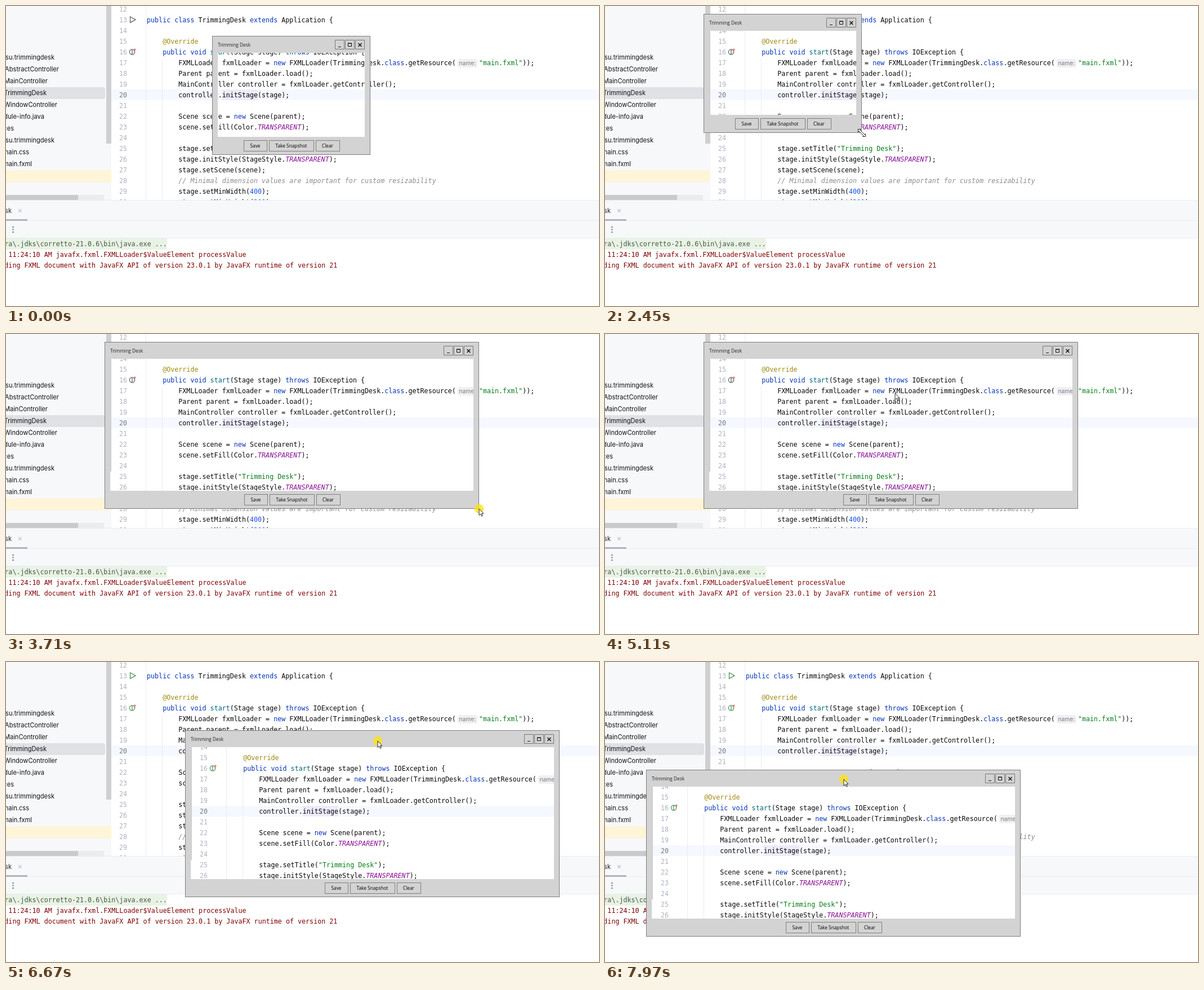
Recreate the animation shown at these times as an HTML page. Size 1053 by 532 pixels, loop 8000 ms.

```html
<!DOCTYPE html>
<html lang="en">
<head>
<meta charset="utf-8">
<title>Trimming Desk</title>
<style>
html, body { margin: 0; width: 1053px; height: 532px; overflow: hidden; background: #fff; }
div, pre, svg { position: absolute; margin: 0; box-sizing: border-box; }
.scene { left: 0; top: 0; width: 1053px; height: 532px; overflow: hidden; background: #fff; }
pre { font: 11.7px/19px "DejaVu Sans Mono", monospace; color: #080808; white-space: pre; }

.editor { left: 187px; top: 0; width: 866px; height: 344px; overflow: hidden; }
.editor > * { position: absolute; }
.caret { left: 0; top: 148px; width: 866px; height: 19px; background: #f5f8fe; }
.used { left: 197px; top: 148px; width: 63px; height: 19px; background: #edebfb; }
.guide { width: 1px; background: #ebecf0; }
.nums { left: 0; top: -3px; width: 28px; text-align: right; color: #aeb3c2; }
.nums b { color: #767a8a; font-weight: normal; }
.code { left: 63px; top: -3px; }
.code b { color: #0033b3; font-weight: normal; }
.code i { color: #871094; }
.code em { color: #8c8c8c; }
.code .s { color: #067d17; }
.code .n { color: #1750eb; }
.code .m { color: #00627a; }
.code .a { color: #9e880d; }
.code u { display: inline-block; width: 35px; height: 15px; margin: 0 3px; border-radius: 3px; vertical-align: middle;
  background: #f0f0f2; color: #7a7d85; font: 10.3px/15px Inter, sans-serif; text-align: center; text-decoration: none; }
.icons { left: 0; top: 0; overflow: visible; fill: none; stroke: var(--icon); }

.tree { left: 0; top: 0; width: 187px; height: 344px; overflow: hidden; background: #f7f8fa; }
.row { left: -100px; height: 21px; font: 11.1px/21px Inter, sans-serif; color: #111; text-align: right; white-space: pre; }
.panel { left: 0; top: 344px; width: 1053px; height: 68px; background: #f7f8fa; border: solid #ebecf0; border-width: 1px 0; }
.panel div { font: 11.1px/20px Inter, sans-serif; color: #222; }
.log { left: -2.7px; top: 413px; color: #7f0000; }
.log span { display: inline-block; height: 19px; background: #e8f3e4; box-shadow: 0 -1px #e8f3e4; color: #46554a; }

#win { border: 1px solid #7f7f7f; font: 8.3px/20px "Open Sans", "Noto Sans", sans-serif; color: #222; }
#frame { inset: 0; border: solid #d3d3d3; border-width: 29px 9px 31px; }
#view { inset: 29px 9px 31px; overflow: hidden; }
#view .scene { left: -185px; top: -44px; }
.title { left: 9px; top: 5px; white-space: pre; }
.ctl { right: 9px; top: 6px; fill: none; stroke: #777; }
.btn { bottom: 5px; height: 20px; border: 1px solid #7f7f7f; background: #d3d3d3; color: #000; line-height: 18px; text-align: center; white-space: pre; }
#snap.hover { background: #dedede; }
#snap.press { background: #c8c8c8; }
#mouse { left: 0; top: 0; width: 1px; height: 1px; overflow: visible; }
</style>
</head>
<body>
<div class="scene">
  <div class="tree">
    <div style="left:-8px;top:144px;width:184px;height:21px;border-radius:4px;background:#dfe1e5"></div>
    <div style="left:0;top:291px;width:187px;height:22px;background:#fef5d9"></div>
    <div style="left:178px;top:0;width:9px;height:244px;background:#cfcfd1"></div>
    <div style="left:0;top:335px;width:174px;height:9px;background:#ececee"></div>
    <div style="left:0;top:335px;width:128px;height:9px;background:#c9cacc"></div>
  </div>
  <div class="editor">
    <div class="caret"></div>
    <div class="used"></div>
    <div class="guide" style="left:61px;top:0;height:344px"></div>
    <div class="guide" style="left:90px;top:92px;height:252px"></div>
    <pre class="nums"></pre>
<pre class="code">

<b>public class</b> TrimmingDesk <b>extends</b> Application {

    <span class="a">@Override</span>
    <b>public void</b> <span class="m">start</span>(Stage stage) <b>throws</b> IOException {
        FXMLLoader fxmlLoader = <b>new</b> FXMLLoader(TrimmingDesk.<b>class</b>.getResource(<u>name:</u><span class="s">"main.fxml"</span>));
        Parent parent = fxmlLoader.load();
        MainController controller = fxmlLoader.getController();
        controller.initStage(stage);

        Scene scene = <b>new</b> Scene(parent);
        scene.setFill(Color.<i>TRANSPARENT</i>);

        stage.setTitle(<span class="s">"Trimming Desk"</span>);
        stage.initStyle(StageStyle.<i>TRANSPARENT</i>);
        stage.setScene(scene);
        <em>// Minimal dimension values are important for custom resizability</em>
        stage.setMinWidth(<span class="n">400</span>);
        stage.setMinHeight(<span class="n">300</span>);
</pre>
    <svg class="icons" width="60" height="344">
      <path d="M33.5 19v10.4l9.5-5.2z" stroke-width="1.2"/>
      <circle cx="37" cy="81.5" r="4.6" stroke-width="1.2"/>
      <path d="M35.5 79h3M37 79v5M35.5 84h3"/>
      <path d="M41.8 82v-6M39.8 78l2-2.2 2 2.2" stroke="#d9543f"/>
    </svg>
  </div>
  <div class="panel">
    <div style="left:0;top:35px;width:1053px;height:1px;background:#ebecf0"></div>
    <div style="left:0;top:33px;width:38px;height:3px;background:#b0b2bc"></div>
    <div style="right:1043px;top:8px">sk</div>
    <svg style="left:21px;top:14px" width="8" height="8" stroke="#a3a6b0"><path d="M1 1l6 6M7 1l-6 6"/></svg>
    <svg style="left:11px;top:45px" width="3" height="13" fill="#55585f"><path d="M.5 1h2v2h-2zM.5 5.5h2v2h-2zM.5 10h2v2h-2z"/></svg>
  </div>
<pre class="log"><span>ra\.jdks\corretto-21.0.6\bin\java.exe ...</span>
 11:24:10 AM javafx.fxml.FXMLLoader$ValueElement processValue
ding FXML document with JavaFX API of version 23.0.1 by JavaFX runtime of version 21</pre>
</div>

<div id="win">
  <div id="frame"></div>
  <div id="view"></div>
  <div class="title">Trimming Desk</div>
  <svg class="ctl" width="53" height="17">
    <path d="M.5.5h16v16H.5zM18.5.5h16v16h-16zM36.5.5h16v16h-16z"/>
    <path d="M6 12.5h5M23.5 6.5h6v5h-6zM23 6h7" stroke="#111"/>
    <path d="M41.5 6l6 6M47.5 6l-6 6" stroke="#111" stroke-width="1.5"/>
  </svg>
  <div class="btn" style="left:calc(50% - 85px);width:42px">Save</div>
  <div class="btn" id="snap" style="left:calc(50% - 40px);width:80px">Take Snapshot</div>
  <div class="btn" style="left:calc(50% + 43px);width:43px">Clear</div>
</div>

<svg id="mouse">
  <circle id="glow" r="8.3" fill="#fbe214" fill-opacity=".8"/>
  <path id="arrow" d="M0 0v11.5l2.7-2.5 1.9 4.2 1.8-.8-1.8-4H8z" fill="#fff" stroke="#111" stroke-width=".9"/>
  <path id="resize" d="M-6.5-6.5h5L-3-5l8 8 1.5-1.5v5h-5L3 5l-8-8-1.5 1.5z" fill="#fff" stroke="#111" stroke-width=".9"/>
</svg>

<script>
const $ = s => document.querySelector(s);
const scene = $('.scene'), win = $('#win'), mouse = $('#mouse');

// tree rows: label and right edge
[['su.trimmingdesk', 86], ['AbstractController', 94], ['MainController', 74], ['TrimmingDesk', 72],
 ['WindowController', 91], ['module-info.java', 68], ['resources', 14], ['su.trimmingdesk', 86],
 ['main.css', 41], ['main.fxml', 46]].forEach(([label, right], i) => {
  const row = document.createElement('div');
  row.className = 'row';
  row.textContent = label;
  row.style.top = Math.round(80.5 + i * 21.1) + 'px';
  row.style.width = right + 100 + 'px';
  $('.tree').append(row);
});
$('.nums').innerHTML = Array.from({ length: 19 }, (_, i) => i === 8 ? '<b>20</b>' : i + 12).join('\n');

const shot = scene.cloneNode(true);
$('#view').append(shot);

// bursts of screen updates: first, last, count
const bursts = [[70, 840, 11], [920, 1680, 11], [1760, 2150, 6], [2380, 2450, 2], [2770, 2770, 1], [2940, 3710, 11],
  [3870, 4410, 8], [4560, 5260, 10], [5410, 6120, 10], [6670, 7360, 10], [7970, 7970, 1]];

function tick(t) {
  let last = 0;
  for (const [a, b, n] of bursts) {
    if (t < a) break;
    const step = n > 1 ? (b - a) / (n - 1) : 1;
    last = Math.min(b, a + Math.floor((t - a) / step + .06) * step);
  }
  return last;
}

// time, window x y w h, pointer x y
const small = [281, 211], big = [665, 296];
const keys = [
  [0, 366, 53, ...small, 430, 60],
  [70, 430, 85, ...small, 430, 60],
  [301, 695, 230, ...small, 430, 60],
  [532, 600, 313, ...small, 430, 60],
  [840, 276, 45, ...small, 430, 60],
  [1300, 175, 14, ...small, 430, 60],
  [1680, 175, 14, ...small, 449, 187],
  [2150, 175, 14, ...small, 454, 222],
  [2380, 175, 14, ...small, 457, 231],
  [2450, 175, 14, ...small, 456, 225],
  [2863, 175, 14, ...small, 456, 225],
  [3710, 175, 14, ...big, 840, 310],
  [3793, 175, 14, ...big, 840, 310],
  [4410, 175, 14, ...big, 510, 291],
  [4700, 175, 14, ...big, 510, 291],
  [5260, 175, 14, ...big, 517, 33],
  [5333, 175, 14, ...big, 517, 33],
  [5725, 264, 72, ...big, 606, 91],
  [6120, 319, 119, ...big, 661, 138],
  [6670, 318, 121, ...big, 660, 140],
  [7130, 83, 179, ...big, 425, 198],
  [7360, 27, 197, ...big, 369, 216],
  [7970, 73, 191, ...big, 424, 208]
];

function pose(t) {
  const i = keys.findIndex(k => k[0] > t);
  if (i < 0) return keys[keys.length - 1].slice(1);
  const a = keys[i - 1], b = keys[i], p = (t - a[0]) / (b[0] - a[0]);
  return a.slice(1).map((v, j) => Math.round(v + (b[j + 1] - v) * p));
}

const show = (el, on) => { el.style.visibility = on ? 'visible' : 'hidden'; };

function draw() {
  const t = tick(performance.now() % 8000);
  const [x, y, w, h, mx, my] = pose(t);
  const within = (a, b) => t >= a && t < b;
  Object.assign(win.style, { left: x + 'px', top: y + 'px', width: w + 'px', height: h + 'px' });
  mouse.style.transform = `translate(${mx}px, ${my}px)`;
  document.body.style.setProperty('--icon', t < 5400 ? '#555a57' : '#3f8a4c');
  show(shot, t >= 4560);
  show($('#resize'), within(1990, 2940));
  show($('#arrow'), within(1440, 1990) || t >= 2940);
  show($('#glow'), within(2770, 3870) || within(4560, 4700) || t >= 5400);
  $('#snap').className = 'btn' + (within(4560, 4700) ? ' press' : within(4400, 4780) ? ' hover' : '');
  requestAnimationFrame(draw);
}
draw();
</script>
</body>
</html>
```
